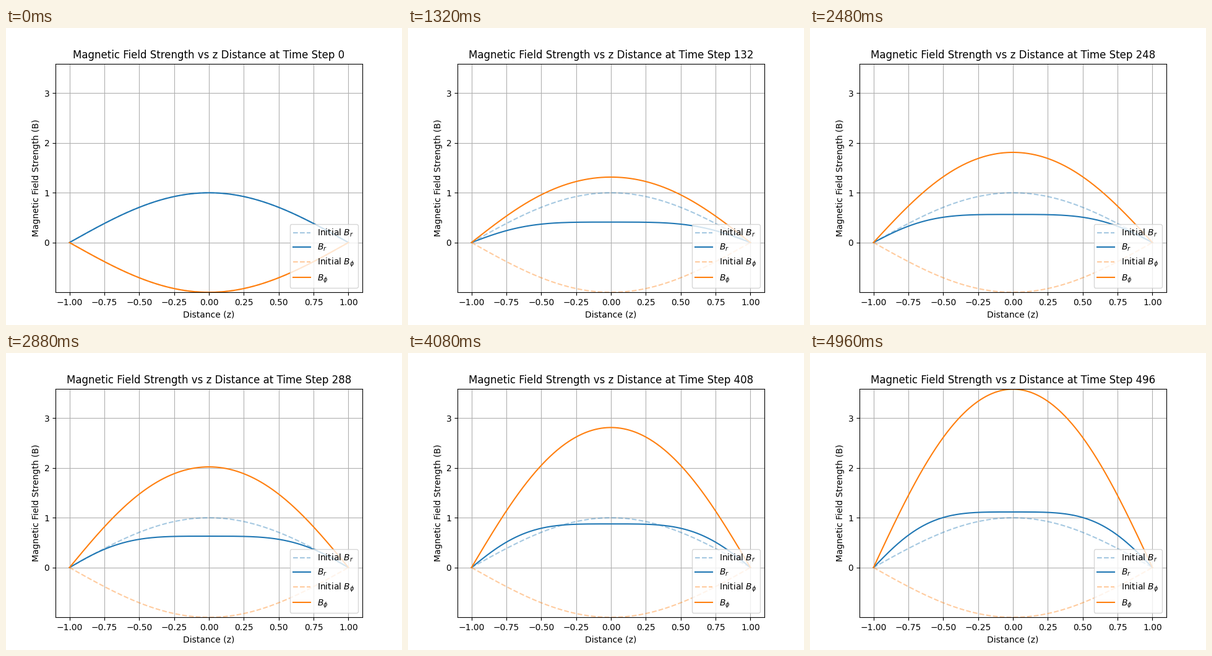
These frames come from a looping animation (640 by 480 pixels, 5000 ms). A matplotlib script:

```python
import numpy as np
import matplotlib.pyplot as plt
from matplotlib.animation import FuncAnimation

FRAMES, INTERVAL = 125, 40
STEPS_PER_FRAME = 4
DT = 0.01
SHEAR = 7.86     # turns B_r into B_phi
GROWTH = 0.275   # rate of the dominant mode

# Diffusing field pair, expanded in cosines that vanish at z = -1 and z = 1
z = np.linspace(-1, 1, 401)
waves = (np.arange(6) + 0.5) * np.pi
basis = np.cos(np.outer(waves, z))
alpha = 0.1 + 6.446 * z**2
coupling = (basis * alpha) @ basis.T * (z[1] - z[0])
decay = -np.diag(waves**2)
system = np.block([[decay, coupling],
                   [SHEAR * np.eye(len(waves)), decay]])

rates, vectors = np.linalg.eig(system)
rates = rates + GROWTH - rates.real.max()
start = np.zeros(2 * len(waves))
start[0], start[len(waves)] = 1, -1
weights = np.linalg.solve(vectors, start)


def fields(step):
    """Return B_r and B_phi along z at a time step."""
    state = (vectors @ (weights * np.exp(rates * step * DT))).real
    return state.reshape(2, -1) @ basis


fig, ax = plt.subplots(figsize=(6.4, 4.8), dpi=100)
lines = []
for field, symbol, color in zip(fields(0), ("$B_r$", r"$B_\phi$"), ("C0", "C1")):
    ax.plot(z, field, color=color, ls="--", alpha=0.4, label=f"Initial {symbol}")
    lines += ax.plot(z, field, color=color, label=symbol)

ax.set_xlim(-1.1, 1.1)
ax.set_ylim(-1, 3.594)
ax.set_yticks(range(4))
ax.set_xlabel("Distance (z)")
ax.set_ylabel("Magnetic Field Strength (B)")
ax.grid(True)
ax.legend(loc="lower right")
title = ax.set_title("")


def update(frame):
    step = frame * STEPS_PER_FRAME
    for line, field in zip(lines, fields(step)):
        line.set_ydata(field)
    title.set_text(f"Magnetic Field Strength vs z Distance at Time Step {step}")
    return [*lines, title]


anim = FuncAnimation(fig, update, frames=FRAMES, interval=INTERVAL,
                     repeat=True, repeat_delay=0)
plt.show()
```
